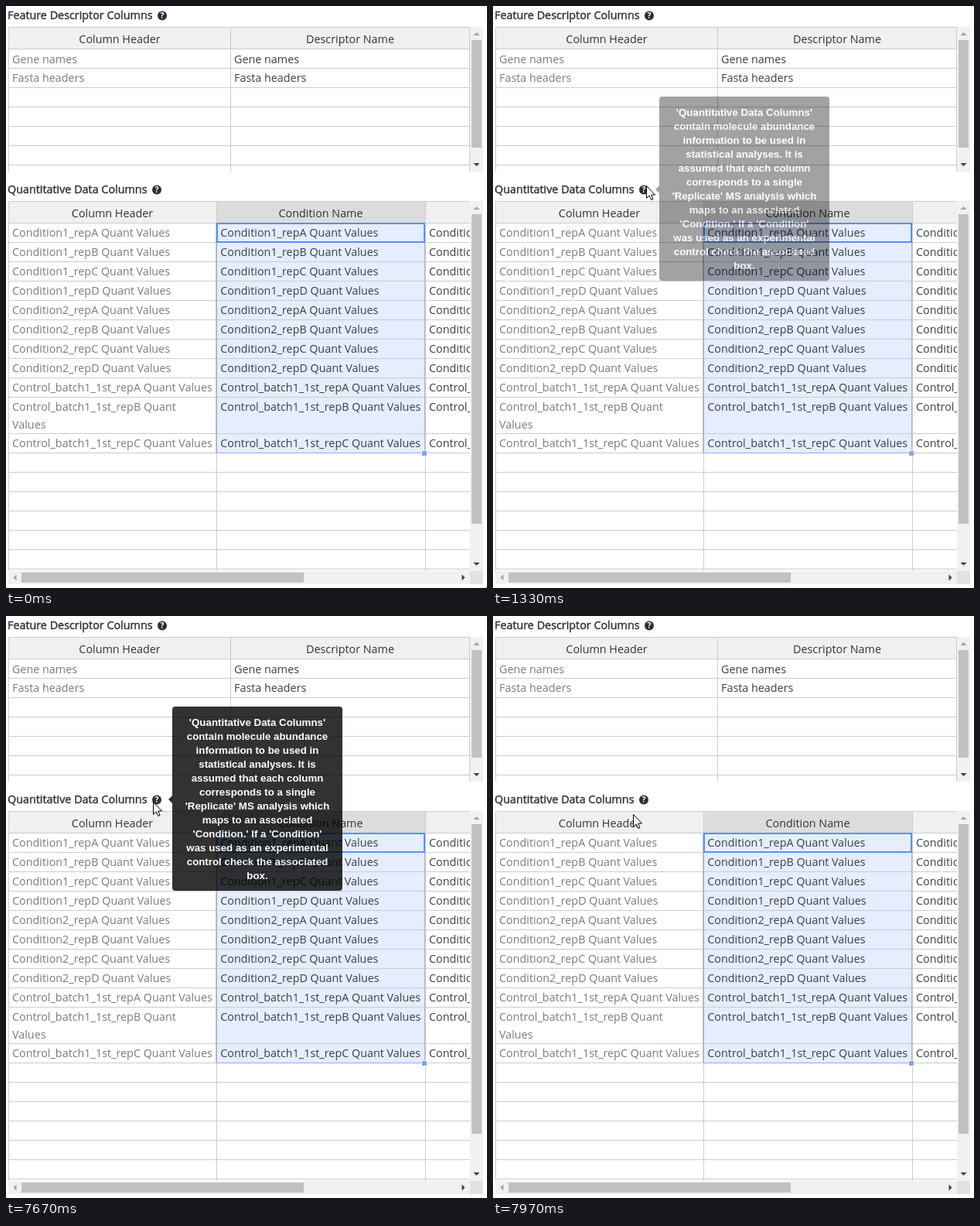
An HTML page for the animation above (8000 ms loop, 622 px wide and 752 px high).

```html
<!DOCTYPE html>
<html lang="en">
<head>
<meta charset="utf-8">
<title>Column tables with help tooltip</title>
<style>
html, body { margin: 0; width: 100%; height: 100%; overflow: hidden; background: #fff; }
svg { display: block; }
text { font: 14.35px "Open Sans", sans-serif; fill: #37404a; white-space: pre; }
.head { fill: #303338; }
.dim { fill: #7b7b7b; }
.title { fill: #2f353b; stroke: #2f353b; stroke-width: .45px; }
.mid { text-anchor: middle; }
.mark { font: bold 10.5px "Open Sans", sans-serif; fill: #fff; text-anchor: middle; }
.tip text { font: bold 13.3px "Liberation Sans", Arial, sans-serif; fill: #fff; text-anchor: middle; }
rect { shape-rendering: crispEdges; }
.tip rect { shape-rendering: auto; }
</style>
</head>
<body>
<svg id="stage" width="622" height="752" viewBox="0 0 622 752">
  <defs>
    <clipPath id="topClip"><rect x="3" y="27" width="597" height="187"/></clipPath>
    <clipPath id="lowClip"><rect x="3" y="252" width="597" height="478"/></clipPath>
  </defs>
  <g id="page"></g>
  <g id="tip" class="tip" opacity="0"></g>
  <path id="cursor" d="M.5.5V16.4L4.2 13L6.7 18.5L9 17.5L6.6 12H11.6Z" fill="#fff" stroke="#000"/>
</svg>
<script>
const LINE = '#ccc', HEAD = '#f0f0f0';
const byId = id => document.getElementById(id);
const rect = (x, y, w, h, fill) => `<rect x="${x}" y="${y}" width="${w}" height="${h}" fill="${fill}"/>`;
const text = (x, y, s, cls = '') => `<text x="${x}" y="${y}" class="${cls}">${s}</text>`;
const hLines = (ys, w) => ys.map(y => rect(3, y, w, 1, LINE)).join('');
const vLines = (xs, y, h) => xs.map(x => rect(x, y, 1, h, LINE)).join('');
const range = (from, n, step) => Array.from({ length: n }, (_, i) => from + i * step);

function title(y, s, iconX) {
  return text(2, y + 5, s, 'title') +
    `<circle cx="${iconX}" cy="${y + .5}" r="6" fill="#2b3035"/>` +
    text(iconX, y + 4.3, '?', 'mark');
}

function arrow(x, y, angle, fill) {
  return `<path d="M-4 2L0-2L4 2Z" transform="translate(${x} ${y}) rotate(${angle})" fill="${fill}"/>`;
}

function vScroll(y, h, thumbEnd) {
  return rect(600, y, 17, h, '#f1f1f1') + rect(602, y + 17, 13, thumbEnd - y - 17, '#c1c1c1') +
    arrow(608.5, y + 9, 0, '#a3a3a3') + arrow(608.5, y + h - 9, 180, '#404040');
}

function topTable() {
  let s = rect(3, 27, 597, 29, HEAD);
  s += hLines([27, 55, ...range(80, 6, 25)], 597) + vLines([3, 290, 599], 27, 187);
  s += text(147, 48, 'Column Header', 'head mid') + text(445, 48, 'Descriptor Name', 'head mid');
  ['Gene names', 'Fasta headers'].forEach((name, i) => {
    const y = 74 + i * 24;
    s += text(8, y, name, 'dim') + text(295, y, name);
  });
  return `<g clip-path="url(#topClip)">${s}</g>`;
}

function lowTable() {
  const names = [];
  for (const group of ['Condition1', 'Condition2', 'Control_batch1_1st'])
    for (const rep of 'ABCD') names.push(`${group}_rep${rep} Quant Values`);
  names.pop();

  let s = rect(3, 252, 597, 29, HEAD) + rect(273, 253, 269, 28, '#dcdcdc');
  s += rect(273, 281, 269, 297, '#e5edfe');
  s += hLines([252, ...range(280, 10, 25), ...range(552, 8, 25)], 597);
  s += vLines([3, 272, 542], 252, 478);
  s += text(137.5, 273, 'Column Header', 'head mid') + text(407, 273, 'Condition Name', 'head mid');
  names.forEach((name, i) => {
    const y = 298 + i * 25 + (i > 9 ? 22 : 0);
    if (i === 9) {
      s += text(8, y, name.replace(' Values', ''), 'dim') + text(8, y + 23, 'Values', 'dim');
    } else {
      s += text(8, y, name, 'dim');
    }
    s += text(277.3, y, name) + text(547, y, name);
  });

  // selected range, active cell and fill handle
  s += rect(271, 281, 1, 297, '#c3c5cc') + rect(272, 281, 1, 297, '#a9abb8');
  s += rect(541, 281, 1, 297, '#a9b2c8') + rect(272, 577, 270, 1, '#89aff9');
  s += '<rect x="273" y="281" width="268" height="24" fill="none" stroke="#5292f7" stroke-width="2"/>';
  s += rect(537, 574, 8, 8, '#fff') + rect(538, 575, 6, 6, '#79a6f8');
  return `<g clip-path="url(#lowClip)">${s}</g>`;
}

function hScroll() {
  return rect(3, 730, 597, 17, '#f1f1f1') + rect(20, 732, 365, 13, '#c1c1c1') +
    arrow(11.5, 738.5, -90, '#a3a3a3') + arrow(591.5, 738.5, 90, '#404040') +
    rect(600, 730, 17, 17, '#e2e2e2');
}

byId('page').innerHTML = title(12, 'Feature Descriptor Columns', 202) + topTable() + vScroll(27, 187, 183) +
  title(237, 'Quantitative Data Columns', 195) + lowTable() + vScroll(252, 478, 669) + hScroll();

const help = ["'Quantitative Data Columns'", 'contain molecule abundance', 'information to be used in',
  'statistical analyses. It is', 'assumed that each column', 'corresponds to a single',
  "'Replicate' MS analysis which", 'maps to an associated', "'Condition.' If a 'Condition'",
  'was used as an experimental', 'control check the associated', 'box.'];
byId('tip').innerHTML = '<rect x="215" y="117" width="220" height="238" rx="4"/><path d="M210 237L215 232V242Z"/>' +
  help.map((s, i) => text(325, 142 + i * 18, s)).join('');

// [time, x, y]: the pointer holds each place until the next entry
const moves = [[0, 621, 751]];
const glide = (times, [x0, y0], [x1, y1], ease) => times.forEach((t, i) => {
  const k = ease((i + 1) / times.length);
  moves.push([t, Math.round(x0 + (x1 - x0) * k), Math.round(y0 + (y1 - y0) * k)]);
});
glide([170, 230, 290, 360, 420, 480, 540, 600, 670, 730], [621, 751], [223, 194], k => k * k * (3 - 2 * k));
glide([870, 930, 1000, 1070, 1130, 1200, 1270], [223, 194], [199, 230], k => k * (2 - k));
moves.push([1330, 198, 232], [1400, 198, 233], [1470, 197, 233], [2070, 196, 233], [2130, 195, 233],
  [7670, 190, 240], [7730, 184, 248], [7900, 183, 252], [7970, 181, 256]);

const fades = [[0, 0], [1270, .13], [1330, .36], [1400, .59], [1470, .8], [7870, .68], [7900, .36], [7970, 0]];

const at = (table, t) => table.findLast(row => row[0] <= t);

function draw(now) {
  const t = Math.max(0, now) % 8000;
  const [, x, y] = at(moves, t);
  byId('cursor').setAttribute('transform', `translate(${x} ${y})`);
  byId('tip').setAttribute('opacity', at(fades, t)[1]);
}

const start = performance.now();
function loop() {
  draw(performance.now() - start);
  requestAnimationFrame(loop);
}
loop();
</script>
</body>
</html>
```
